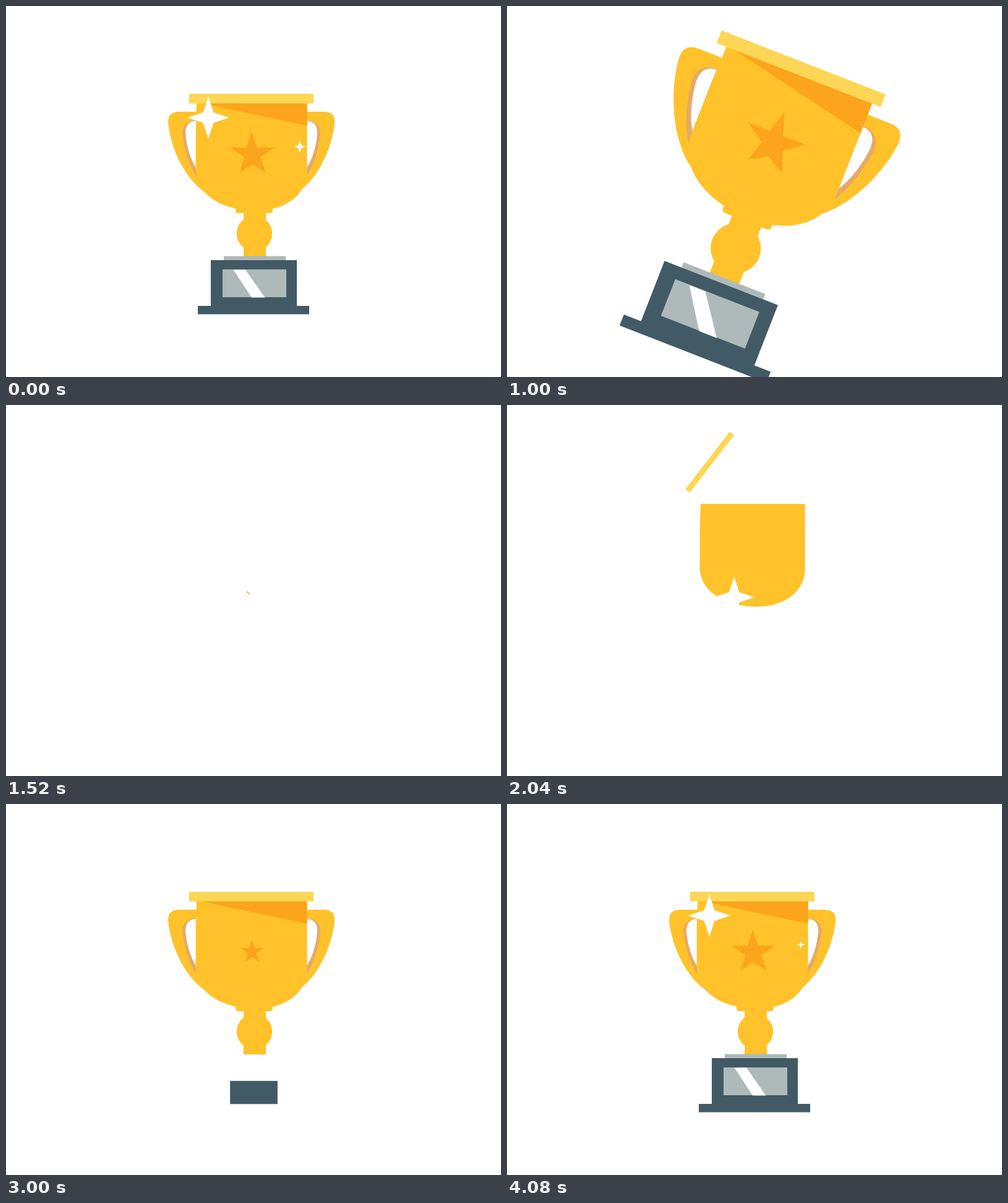
These frames come from a looping animation (800 by 600 pixels, 4.12 s). An HTML page:

```html
<!DOCTYPE html>
<html lang="en">
<head>
<meta charset="utf-8">
<title>Trophy</title>
<style>
  html, body { margin: 0; width: 100%; height: 100%; overflow: hidden; background: #fff; }
  svg { display: block; width: 100vw; height: 100vh; }
</style>
</head>
<body>
<svg viewBox="0 0 800 600">
  <defs>
    <g id="handle">
      <path fill="#ffc22a" d="M312 171H279Q262 171 262 188C266 230 288 275 316 297Q321 302 328 303L332 240V171Z"/>
      <path fill="#e8a866" d="M309 184.5C293 185 285 193 285 206C289 240 298 264 314 285L320 250V184.5Z"/>
      <path fill="#fff" d="M309 185.5C295 186 290 193 290 206C292 228 298 247 307 262L312 250V185.5Z"/>
    </g>
    <path id="glint" fill="#fff" d="M0-34L8.5-8.5L34 0L8.5 8.5L0 34L-8.5 8.5L-34 0L-8.5-8.5Z"/>
  </defs>
  <g id="trophy">
    <g id="left"><use href="#handle"/></g>
    <g id="right"><use href="#handle" transform="translate(793.2 0) scale(-1 1)"/></g>
    <g id="stem" fill="#ffc22a">
      <rect x="384" y="325" width="36" height="80"/>
      <circle cx="401.5" cy="368" r="28.7"/>
    </g>
    <rect id="foot" x="371" y="325" width="60" height="10" rx="4.5" fill="#ffc22a"/>
    <path id="cup" fill="#ffc22a" d="M308 155.2H486.5V268C486.5 303 453 331 405 331C346 331 306.7 303 306.7 264V200Z"/>
    <path id="shade" fill="#fba41c" d="M315 157H486.5V193.5Z"/>
    <rect id="rim" x="296" y="142" width="201" height="15.5" fill="#fdd655"/>
    <path id="star" fill="#fba41c" d="M397 203L405.5 229H433L411 244.5L419.5 268.5L398 256.5L378 268.5L385 244.5L362.5 229H389Z"/>
    <rect id="plate" x="352" y="404.5" width="100" height="7" fill="#aebab9"/>
    <rect id="box" x="331" y="411" width="139" height="74.5" fill="#415a66"/>
    <rect id="bar" x="310" y="485" width="180" height="13.5" fill="#415a66"/>
    <rect id="panel" x="350" y="426" width="103" height="45" fill="#aebab9"/>
    <path id="shine" fill="#fff" d="M367.5 426.5H387L418.5 471.5H397Z"/>
  </g>
  <use id="big" href="#glint"/>
  <use id="small" href="#glint"/>
</svg>
<script>
  const LOOP = 4120, START = 520, REBUILD = 1540;
  const part = {};
  document.querySelectorAll('svg > [id], #trophy > [id]').forEach(el => part[el.id] = el);

  const ramp = (t, from, to) => Math.min(1, Math.max(0, (t - from) / (to - from)));
  const smooth = (t, from, to) => (1 - Math.cos(Math.PI * ramp(t, from, to))) / 2;
  const slow = (t, from, to) => 1 - (1 - ramp(t, from, to)) ** 2;
  // Passes its goal by a few percent, then settles.
  function spring(t, from, to) {
    const u = ramp(t, from, to);
    return 1 - (1 - u) ** 2 * Math.cos(.9 * Math.PI * u);
  }
  const pulse = (t, from, to) => Math.min(1, 1.5 * Math.sin(Math.PI * ramp(t, from, to)));

  const move = (name, value) => part[name].setAttribute('transform', value);
  const show = (name, on) => part[name].setAttribute('visibility', on ? 'visible' : 'hidden');

  function grow(name, x, y, sx, sy = sx) {
    show(name, sx > .001 && sy > .001);
    move(name, `translate(${x} ${y}) scale(${sx} ${sy}) translate(${-x} ${-y})`);
  }

  // Slides a part out from behind the cup.
  function slide(name, dx, dy, progress) {
    show(name, progress > 0);
    move(name, `translate(${dx * (1 - progress)} ${dy * (1 - progress)})`);
  }

  // The rim swings in along an arc while it turns level.
  function swingRim(t) {
    const r = slow(t, 1907, 2284), rest = 1 - r;
    show('rim', r > 0);
    move('rim', `translate(${396.5 - 166 * rest} ${149.7 - 236 * r * rest})
      rotate(${-126 * rest}) scale(${r}) translate(-396.5 -149.7)`);
  }

  function build(t) {
    grow('cup', 396.5, 242, smooth(t, 1480, 2140));
    swingRim(t);
    grow('shade', 486.5, 157, smooth(t, 2280, 2480));
    slide('foot', 0, -12, smooth(t, 2360, 2520));
    slide('right', -100, 0, spring(t, 2480, 2800));
    slide('left', 100, 0, spring(t, 2560, 2880));
    slide('stem', 0, -82, smooth(t, 2640, 2960));
    grow('star', 397.5, 238, spring(t, 2920, 3260));
    grow('box', 400.5, 485, spring(t, 2760, 3760), smooth(t, 2720, 3280));
    grow('plate', 402, 411, smooth(t, 3040, 3240));
    grow('panel', 401.5, 448.5, smooth(t, 3200, 3400));
    grow('bar', 400, 485, spring(t, 3360, 3680));
    const light = smooth(t, 3400, 3740);
    slide('shine', -21, 0, light);
    part.shine.setAttribute('opacity', light);
  }

  // Swells and tilts, then spins away to nothing.
  function leave(t) {
    const turn = 21.2 * ((t - START) / 480) ** 2.46;
    const swell = 1 + .415 * smooth(t, START, 980);
    const shrink = (1 + (Math.max(0, t - 1000) / 275) ** 2) ** -3;
    const drift = smooth(t, 1100, 1500);
    move('trophy', `translate(${395.8 - 3.8 * drift} ${302.6 + 1.4 * drift})
      rotate(${turn}) scale(${swell * shrink}) translate(-395.8 -302.6)`);
  }

  function twinkle(name, x, y, size) {
    show(name, size > .001);
    move(name, `translate(${x} ${y}) scale(${size})`);
  }

  function draw(now) {
    const phase = now % LOOP;
    const t = phase < START ? phase + LOOP : phase;
    const leaving = t < REBUILD;
    build(leaving ? START + LOOP : t);
    if (leaving) leave(t);
    else move('trophy', '');
    if (t < 3000) twinkle('big', 367, 311, .98 * pulse(t, 1860, 2240));
    else twinkle('big', 327, 180.5, pulse(t, 3880, 4520));
    if (t < 3800) twinkle('small', 412.3, 358, .28 * pulse(t, 3320, 3640));
    else twinkle('small', 474.8, 227.5, .3 * pulse(t, 4020, 4480));
  }

  const begin = performance.now();
  function tick() {
    draw(performance.now() - begin);
    requestAnimationFrame(tick);
  }
  tick();
</script>
</body>
</html>
```
